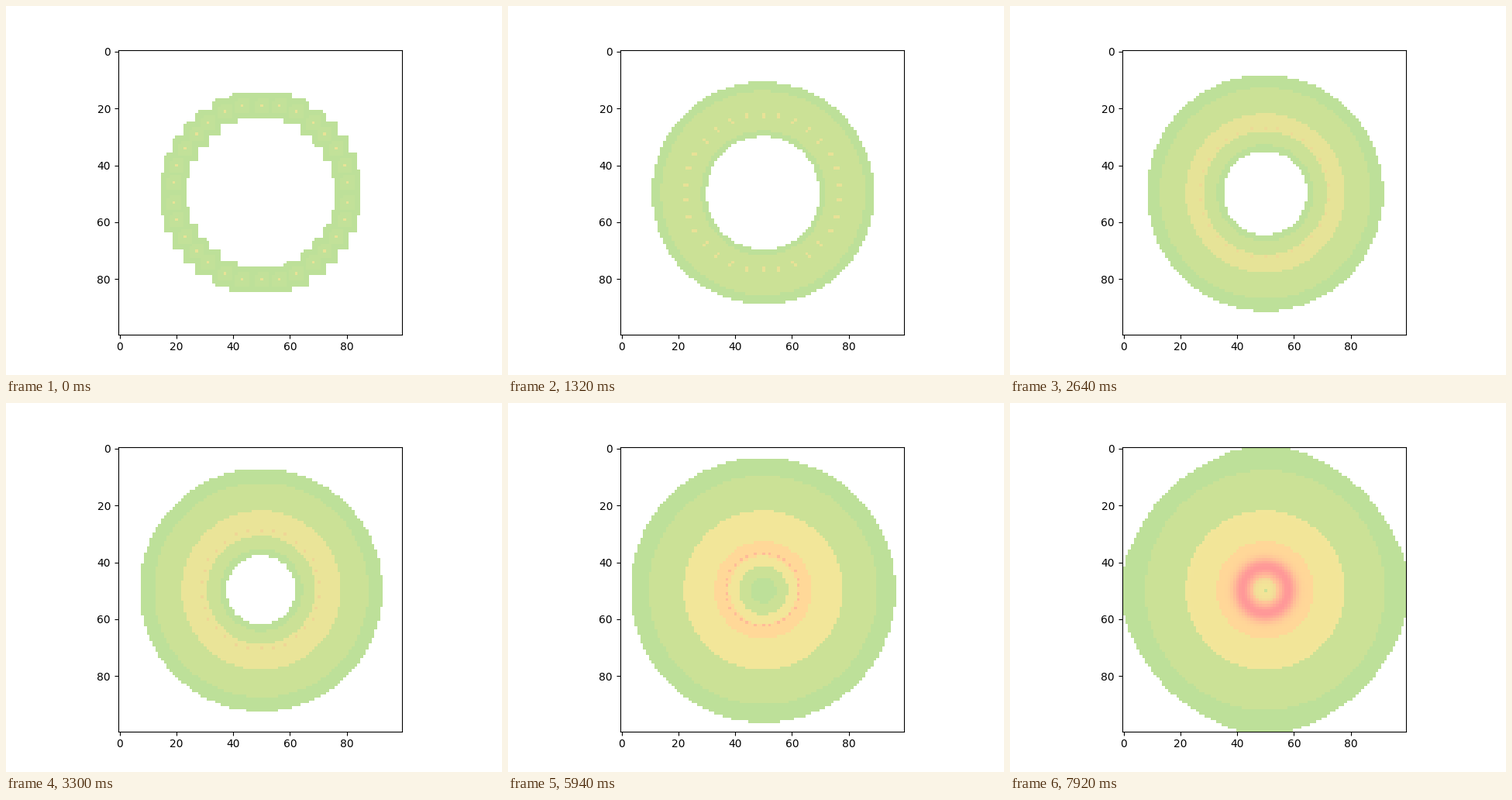
Animation of 640x476 px, one loop 8000 ms. Source, as a matplotlib script:

```python
import numpy as np
import matplotlib.pyplot as plt
from matplotlib.animation import FuncAnimation
from matplotlib.colors import to_rgb

SIZE, STEPS, WALKERS = 100, 25, 30
STEP_MS, TICK_MS, LOOP_MS = 330, 20, 8000
START_R = 30.8  # walkers close in by one cell per step

DARK, FAINT, LIGHT = "#bde099", "#c2e199", "#cbe196"
SPOT, YELLOW, ORANGE = "#e8e296", "#f2e699", "#ffd898"
PINK, RED = "#ffbc98", "#ff9898"

YY, XX = np.mgrid[:SIZE, :SIZE]
CENTRE = 49.7
DIST = np.hypot(XX - CENTRE, YY - CENTRE)
ANGLE = np.arctan2(YY - CENTRE, XX - CENTRE)


def mix(a, b, t):
    t = np.clip(t, 0, 1)
    return (1 - t) * np.array(to_rgb(a)) + t * np.array(to_rgb(b))


def walkers(n):
    a = np.arange(WALKERS) * 2 * np.pi / WALKERS
    r = START_R - n
    x = (50 + r * np.sin(a) + 1e-9).astype(int)
    y = (50 - r * np.cos(a) + 1e-9).astype(int)
    return x, y


def dots(img, n, color):
    x, y = walkers(n)
    img[y, x] = to_rgb(color)


def boxes(half):
    """Boxes around the starting points, each without its top left cell."""
    mask = np.zeros((SIZE, SIZE), bool)
    for x, y in zip(*walkers(0)):
        dx, dy = XX - x, YY - y
        box = np.maximum(abs(dx), abs(dy)) <= half
        mask |= box & ~((dx == -half) & (dy == -half))
    return mask


def ring(img, color, outer, inner):
    img[(DIST <= outer) & (DIST > inner)] = to_rgb(color)


def body(n):
    """Everything the trail has spread to after n steps."""
    edge = 36.3 + 0.72 * n - 0.0082 * n ** 2
    bulge = 2 * np.clip((n - 18) / 4, 0, 1) * np.cos(2 * ANGLE) ** 4
    hole = START_R - n - (5.75 + 0.3 * n)
    mask = DIST <= edge + bulge
    if hole > 2:
        mask &= DIST > hole
    if n < 4:
        mask &= boxes(4 + n) | ((DIST < START_R) & (n > 0))
    return mask


def field(n):
    img = np.ones((SIZE, SIZE, 3))
    r = START_R - n
    img[body(n)] = to_rgb(DARK)

    # each band keeps its outer edge while its inner edge trails the walkers
    if n == 0:
        img[boxes(2)] = to_rgb(FAINT)
    else:
        ring(img, mix(FAINT, LIGHT, n / 4),
             34.6 + 0.31 * n, r - (4 + 0.235 * n))
    if n > 4:
        ring(img, mix("#e3e397", YELLOW, (n - 6) / 8),
             27.9, r - 0.31 * (n - 4.2))
    if n > 14:
        ring(img, ORANGE, 17.1, r - 0.3 * (n - 15))

    # the hot core glows just behind the walkers
    ramp = np.clip((n - 18) / 4, 0, 1)
    glow = ramp * np.exp(-((DIST - r - 1.2) / 3.2) ** 2)[..., None]
    img += glow * (np.array(to_rgb(RED)) - img)

    if 0 < n < 6:
        dots(img, n - 1, SPOT)
    if n < 22:
        dots(img, n, mix(SPOT, PINK, (n / 18) ** 2))
    return img


fields = [field(n) for n in range(STEPS)]

fig, ax = plt.subplots(figsize=(6.4, 4.76), dpi=100)
image = ax.imshow(fields[0], interpolation="nearest")


def draw(i):
    image.set_data(fields[min(i * TICK_MS // STEP_MS, STEPS - 1)])
    return [image]


anim = FuncAnimation(fig, draw, frames=LOOP_MS // TICK_MS, interval=TICK_MS,
                     repeat=True, repeat_delay=0)
plt.show()
```
